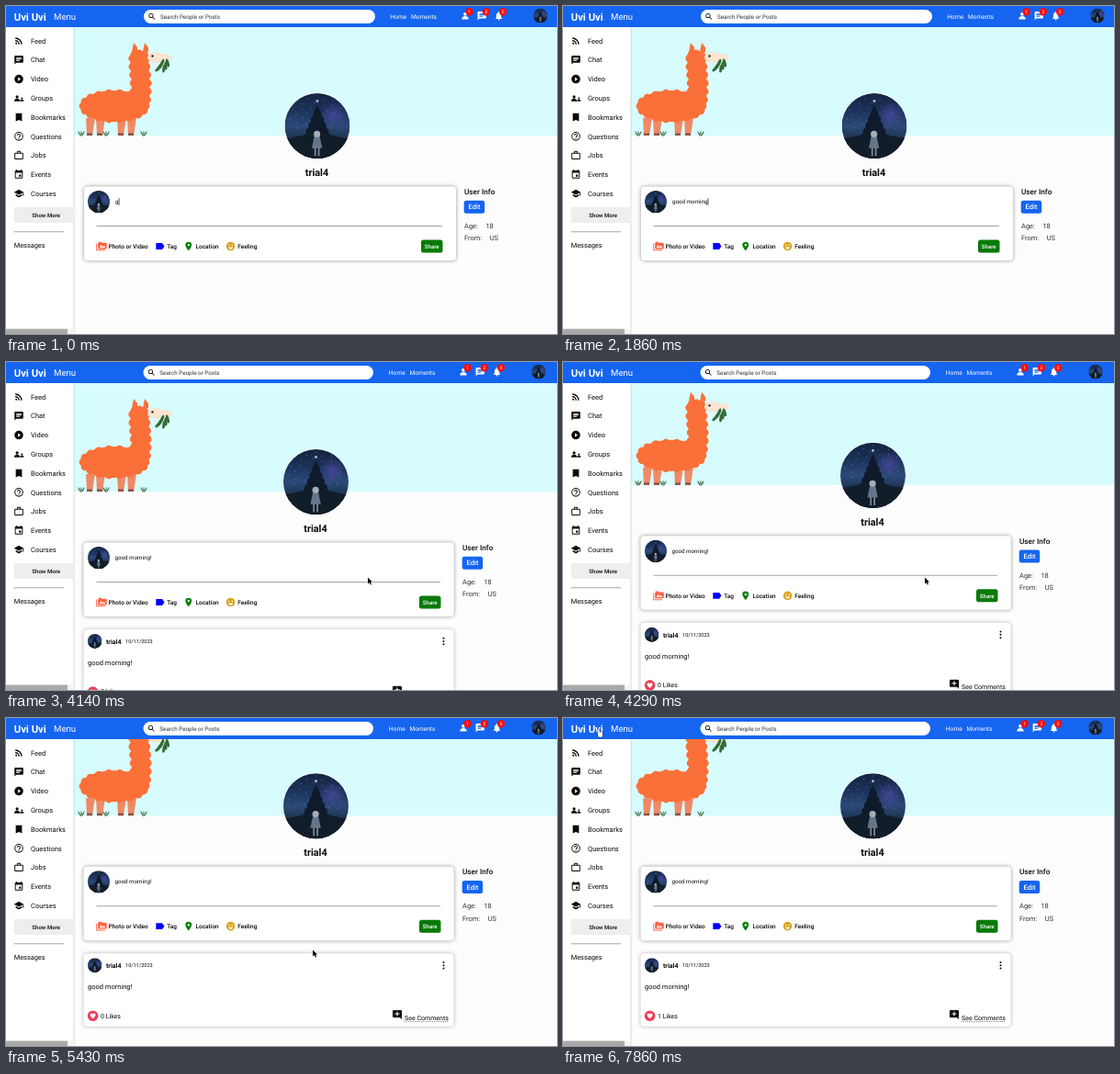
Write an HTML page with a canvas that moves like this. It is 600x357 px and loops after 8 s.

```html
<!DOCTYPE html>
<html lang="en">
<head>
<meta charset="utf-8">
<title>Profile page</title>
<style>
  html, body { margin: 0; width: 100%; height: 100%; overflow: hidden; background: #fdfdfd; }
  canvas { display: block; width: 600px; height: 357px; }
</style>
</head>
<body>
<canvas id="stage"></canvas>
<script>
const W = 600, H = 357, LOOP = 8000, STEP = 1000 / 7, TAU = Math.PI * 2;
const BLUE = '#1565f0', INK = '#0a0a0a', FONT = 'Roboto, Arial, sans-serif';
const SITE = 'Uvi Uvi', USER = 'trial4', POST = 'good morning!';

const canvas = document.getElementById('stage');
const c = canvas.getContext('2d');
const dpr = window.devicePixelRatio || 1;
canvas.width = W * dpr;
canvas.height = H * dpr;

// Path builders; overlaps cut holes under the even-odd rule
function disc(p, x, y, rx, ry = rx) {
  p.moveTo(x + rx, y);
  p.ellipse(x, y, rx, ry, 0, 0, TAU);
}

function block(p, x, y, w, h, r = 0) {
  p.roundRect(x, y, w, h, r);
}

function shape(p, ...points) {
  points.forEach(([x, y], i) => i ? p.lineTo(x, y) : p.moveTo(x, y));
  p.closePath();
}

// Head and shoulders, feet on y
function bust(p, x, y, r) {
  disc(p, x, y - 3 * r, r);
  p.moveTo(x + 2 * r, y);
  p.lineTo(x - 2 * r, y);
  p.bezierCurveTo(x - 2 * r, y - 2.4 * r, x + 2 * r, y - 2.4 * r, x + 2 * r, y);
}

// Icons on a 24 unit grid
const ICONS = {
  feed(p) {
    disc(p, 6.2, 17.8, 2.2);
    for (const r of [7.1, 12.8]) {
      p.moveTo(4, 20 - r);
      p.arc(4, 20, r, -TAU / 4, 0);
      p.arc(4, 20, r + 2.8, 0, -TAU / 4, true);
    }
  },
  chat(p) {
    block(p, 2, 2, 20, 16, 2);
    shape(p, [2, 18], [6, 18], [2, 22]);
    for (let i = 0; i < 3; i++) block(p, 6, 6 + 3 * i, i < 2 ? 12 : 8, 2);
  },
  play(p) {
    disc(p, 12, 12, 10);
    shape(p, [10, 7.5], [10, 16.5], [16, 12]);
  },
  group(p) {
    bust(p, 8, 19, 3.3);
    bust(p, 19, 19, 2.2);
  },
  mark(p) {
    shape(p, [5, 3], [19, 3], [19, 21], [12, 18], [5, 21]);
  },
  help(p) {
    disc(p, 12, 12, 10);
    disc(p, 12, 12, 8);
    block(p, 11, 16, 2, 2);
    p.moveTo(8, 10);
    p.arc(12, 10, 4, TAU / 2, TAU / 8);
    p.lineTo(13, 15);
    p.lineTo(11, 15);
    p.arc(12, 10, 2, TAU / 8, TAU / 2, true);
  },
  work(p) {
    block(p, 2, 6, 20, 15, 2);
    block(p, 4, 8, 16, 11);
    shape(p, [8, 6], [8, 2], [16, 2], [16, 6], [14, 6], [14, 4], [10, 4], [10, 6]);
  },
  event(p) {
    block(p, 3, 3, 18, 18, 2);
    block(p, 5, 8, 14, 11);
    block(p, 12, 12, 5, 5);
    for (const x of [6, 16]) block(p, x, 1, 2, 2);
  },
  school(p) {
    shape(p, [12, 3], [1, 9], [12, 15], [23, 9]);
    shape(p, [5, 13], [5, 17], [12, 21], [19, 17], [19, 13], [12, 17]);
    block(p, 21, 10, 2, 7);
  },
  person(p) {
    bust(p, 12, 20, 4);
  },
  bell(p) {
    p.moveTo(4, 19);
    p.bezierCurveTo(9, 16, 3, 4, 12, 4);
    p.bezierCurveTo(21, 4, 15, 16, 20, 19);
    disc(p, 12, 3.5, 1.5);
    disc(p, 12, 20.5, 2, 1.5);
  },
  search(p) {
    disc(p, 9.5, 9.5, 6.5);
    disc(p, 9.5, 9.5, 4.5);
    shape(p, [15, 13.6], [20.5, 19], [19, 20.5], [13.6, 15]);
  },
  media(p) {
    block(p, 4, 4, 20, 14, 2);
    block(p, 5, 2, 7, 2);
    shape(p, [0, 6], [2, 6], [2, 20], [20, 20], [20, 22], [0, 22]);
    shape(p, [7, 15], [11.5, 9], [15, 13.5], [17.5, 10.5], [21, 15]);
  },
  tag(p) {
    shape(p, [3, 5], [17, 5], [22, 12], [17, 19], [3, 19]);
  },
  pin(p) {
    p.moveTo(12, 22);
    p.bezierCurveTo(1, 9, 4, 2, 12, 2);
    p.bezierCurveTo(20, 2, 23, 9, 12, 22);
    disc(p, 12, 9, 2.5);
  },
  smile(p) {
    disc(p, 12, 12, 10);
    for (const x of [8.5, 15.5]) disc(p, x, 9.5, 1.5);
    p.moveTo(17, 14);
    p.arc(12, 13.5, 5, 0.1, TAU / 2 - 0.1);
  },
  comment(p) {
    block(p, 2, 2, 20, 16, 2);
    shape(p, [18, 18], [22, 18], [22, 22]);
    block(p, 7, 9, 10, 2);
    for (const y of [5, 11]) block(p, 11, y, 2, 4);
  },
  heart(p) {
    p.moveTo(12, 21.4);
    p.bezierCurveTo(-6, 7, 6, -2, 12, 5);
    p.bezierCurveTo(18, -2, 30, 7, 12, 21.4);
  }
};
for (const name in ICONS) {
  const p = new Path2D();
  ICONS[name](p);
  ICONS[name] = p;
}

const MENU = { feed: 'Feed', chat: 'Chat', play: 'Video', group: 'Groups', mark: 'Bookmarks',
  help: 'Questions', work: 'Jobs', event: 'Events', school: 'Courses' };
const TOOLS = [['media', 'tomato', 'Photo or Video'], ['tag', 'blue', 'Tag'],
  ['pin', 'green', 'Location'], ['smile', 'goldenrod', 'Feeling']];
const ALERTS = { person: 1, chat: 3, bell: 0 };

// Text whose capitals are centred on y
function text(s, x, y, size, weight = 400, color = INK, align = 'left') {
  c.font = `${weight} ${size}px ${FONT}`;
  c.textAlign = align;
  c.fillStyle = color;
  c.fillText(s, x, y + size * 0.355);
}

function box(x, y, w, h, r, color) {
  c.fillStyle = color;
  c.beginPath();
  c.roundRect(x, y, w, h, r);
  c.fill();
}

function oval(x, y, rx, ry, color, turn = 0) {
  c.fillStyle = color;
  c.beginPath();
  c.ellipse(x, y, rx, ry, turn, 0, TAU);
  c.fill();
}

const dot = (x, y, r, color) => oval(x, y, r, r, color);

function poly(color, ...points) {
  c.fillStyle = color;
  c.beginPath();
  shape(c, ...points);
  c.fill();
}

function icon(name, x, y, size, color = INK) {
  c.save();
  c.translate(x - size / 2, y - size / 2);
  c.scale(size / 24, size / 24);
  c.fillStyle = color;
  c.fill(ICONS[name], 'evenodd');
  c.restore();
}

function card(x, y, w, h, shade) {
  c.save();
  c.shadowColor = `rgba(0,0,0,${shade})`;
  c.shadowBlur = 4 * dpr;
  box(x, y, w, h, 4, '#fff');
  c.restore();
}

function rule(x1, x2, y) {
  box(x1, y - 0.5, x2 - x1, 1, 0, '#a4a4a4');
}

function gradient(g, ...colors) {
  colors.forEach((color, i) => g.addColorStop(i / (colors.length - 1), color));
  c.fillStyle = g;
  c.fillRect(-1, -1, 2, 2);
}

// Night scene in a round crop
function avatar(x, y, r) {
  c.save();
  c.translate(x, y);
  c.scale(r, r);
  c.beginPath();
  c.arc(0, 0, 1, 0, TAU);
  c.clip();
  gradient(c.createLinearGradient(0, -1, 0, 1), '#13243f', '#1a3158', '#2b4978', '#1a2d43', '#121d29');
  gradient(c.createRadialGradient(0.5, -0.35, 0, 0.5, -0.35, 0.4), 'rgba(85,75,175,.65)', 'rgba(85,75,175,0)');
  for (let i = 0; i < 40; i++) {
    const a = i * 2.4, d = Math.sqrt(i / 40);
    dot(Math.cos(a) * d, Math.sin(a) * d * 0.6 - 0.35, 0.014, '#7f97cc');
  }
  dot(0, -0.76, 0.04, '#aebcd8');
  // stepped tower
  for (let i = 0; i < 6; i++) {
    const top = -0.65 + i * 0.17, half = 0.12 + i * 0.075;
    poly('#0f1a2b', [0, top], [half, top + 0.25], [half, 1], [-half, 1], [-half, top + 0.25]);
  }
  poly('#121d2a', [-1, 0.4], [0, 0.2], [1, 0.4], [1, 1], [-1, 1]);
  poly('#65758a', [-0.09, 0.3], [0.07, 0.3], [0.15, 0.68], [-0.17, 0.68]);
  for (const lx of [-0.09, 0.02]) box(lx, 0.66, 0.05, 0.26, 0, '#7b889a');
  dot(-0.01, 0.25, 0.1, '#a3adbb');
  c.restore();
}

// Ellipse with a curly rim
function wool(x, y, rx, ry, curls, color) {
  oval(x, y, rx, ry, color);
  for (let i = 0; i < curls; i++) {
    const a = i / curls * TAU;
    dot(x + Math.cos(a) * (rx - 3), y + Math.sin(a) * (ry - 3), 4.4, color);
  }
}

function llama() {
  const coat = '#fb7039';
  for (const x of [87, 98, 121, 132]) {
    poly('#ef8a66', [x, 122], [x + 10, 122], [x + 7, 141], [x + 1, 141]);
    box(x + 1, 138.5, 6, 2.5, 0, '#8b5148');
  }
  for (const x of [82, 109, 150]) {
    for (const turn of [-0.5, 0, 0.5]) oval(x + turn * 4, 139, 0.6, 3, '#35683a', turn);
  }
  wool(118, 109, 37, 17, 18, coat);
  for (let i = 0; i < 6; i++) {
    wool(146 + Math.sin(i) * 0.8, 102 - i * 9, 10.5, 8, 8, coat);
  }
  for (const x of [138, 150]) poly(coat, [x - 1, 50], [x + 1, 40], [x + 5, 45], [x + 5, 50]);
  oval(163, 56, 9, 6, '#f8e5d2');
  oval(172, 56, 9, 4, '#f8e5d2');
  dot(159.5, 54.5, 1.2, '#38231f');
  for (let i = 0; i < 6; i++) {
    oval(176 - i * 2, 62 + i % 3 * 3, 4.6, 1.6, '#356b35', 1.3 + i * 0.22);
  }
}

function composer(dx, typed, caret) {
  card(85 - dx / 4, 196.5, 405 - dx * 0.85, 80.5, 0.42);
  avatar(101, 213, 12);
  const x = 119 - dx / 4;
  text(typed, x, 213, 6.2);
  if (caret) box(x + c.measureText(typed).width + 0.2, 209.3, 0.7, 7.4, 0, '#000');
  rule(98.5, 475 - dx, 239.5);
  let left = 98.3;
  for (const [name, color, label] of TOOLS) {
    icon(name, left + 5.7, 261.5, 11.6, color);
    text(label, left + 13.3, 261.5, 6.5, 500);
    left += 20.5 + c.measureText(label).width;
  }
  box(452 - dx, 254.5, 23.5, 14, 2.5, '#087a08');
  text('Share', 463.7 - dx, 261.6, 6.1, 500, '#fff', 'center');
}

function post(likes) {
  card(84.5, 291, 403, 79.5, 0.3);
  avatar(96.7, 303.8, 7.8);
  text(USER, 109, 304.2, 7, 700);
  text('10/11/2023', 130, 304, 5.6);
  for (const dy of [-3.3, 0, 3.3]) dot(476.5, 304 + dy, 1, INK);
  text(POST, 89, 327, 7.5);
  dot(94.6, 359, 5.8, '#ec3e57');
  icon('heart', 94.6, 359.3, 7.4, '#fff');
  text(likes + ' Likes', 103, 359, 7);
  icon('comment', 426, 357.8, 12);
  text('See Comments', 434, 361, 7.05);
  for (let x = 434; x < 482; x += 2) box(x, 365, 1, 0.8, 0, '#555');
}

function userInfo(x) {
  text('User Info', x, 202, 8.2, 500);
  box(x - 0.3, 211.7, 22.5, 14, 2.5, BLUE);
  text('Edit', x + 11, 218.7, 7.5, 500, '#fff', 'center');
  [['Age:', '18'], ['From:', 'US']].forEach(([label, value], i) => {
    const y = 239 + i * 13.8;
    text(label, x, y, 7.5, 400, '#333');
    text(value, x + 8.5 + c.measureText(label).width, y, 7.5, 400, '#333');
  });
}

function profile(s, dx) {
  c.save();
  c.translate(0, -s.scroll);
  box(74, 0, 526, 141, 0, '#d7fcfd');
  llama();
  const mid = 339 - dx * 0.75;
  dot(mid, 130.5, 36.2, '#fff');
  avatar(mid, 130.5, 35.5);
  text(USER, mid - 0.5, 181, 10.9, 700, INK, 'center');
  composer(dx, s.typed, !s.shared);
  userInfo(499 - dx);
  if (s.shared) post(s.likes);
  c.restore();
}

function sidebar() {
  c.save();
  c.shadowColor = 'rgba(0,0,0,.2)';
  c.shadowBlur = 2 * dpr;
  box(0, 15, 73.5, 350, 0, '#fff');
  c.restore();
  Object.entries(MENU).forEach(([name, label], i) => {
    const y = 38 + i * 20.77;
    icon(name, 14, y, 11.5);
    text(label, 27, y, 7.5);
  });
  box(8.7, 219, 65, 17, [2, 0, 0, 2], '#eee');
  text('Show More', 43.7, 227.7, 6.1, 500, INK, 'center');
  rule(8.7, 63, 245.7);
  text('Messages', 8.7, 260.5, 7.4);
  box(0, 351.5, 73.5, 7, 0, '#f3f3f3');
  box(0, 351.5, 67, 7, 0, '#a9a9a9');
}

function header(dx) {
  box(0, -2, W, 25, 0, BLUE);
  text(SITE, 8.7, 11.7, 11.3, 700, '#fff');
  text('Menu', 52, 12, 9.6, 400, '#fff');
  box(150 - dx / 4, 4, 252 - dx * 0.75, 15, 7.5, '#fff');
  icon('search', 159 - dx / 4, 11.5, 9.5);
  text('Search People or Posts', 168 - dx / 3, 11.6, 6.3, 400, '#333');
  text('Home', 418.3 - dx * 0.75, 11.6, 6.7, 400, '#fff');
  text('Moments', 441 - dx * 0.8, 11.6, 6.6, 400, '#fff');
  Object.entries(ALERTS).forEach(([name, count], i) => {
    const x = 500 + i * 18.3 - dx;
    icon(name, x, 10.7, 11.3, '#fff');
    dot(x + 4.6, 6.2, 4.2, '#fb0d0d');
    text(count, x + 4.6, 6.2, 5, 400, '#fff', 'center');
  });
  avatar(582 - dx, 10.5, 7.8);
}

function arrow() {
  c.beginPath();
  shape(c, [0, 0], [0, 7], [1.7, 5.5], [2.8, 8], [4, 7.5], [2.9, 5], [5, 5]);
}

function hand() {
  c.beginPath();
  c.roundRect(1.2, 0, 1.5, 6, 0.7);
  c.roundRect(1.2, 3.2, 5, 5.6, 1.2);
  shape(c, [0, 4.4], [1.8, 5], [2, 8]);
}

function pointer(x, y, pressing) {
  c.save();
  c.translate(x, y);
  c.lineJoin = 'round';
  c.lineWidth = 0.9;
  c.strokeStyle = pressing ? '#000' : '#fff';
  c.fillStyle = pressing ? '#fff' : '#000';
  (pressing ? hand : arrow)();
  c.stroke();
  c.fill();
  c.restore();
}

// Eased value between keys; the first entry of each key is its time
function track(t, keys, col = 1) {
  const i = keys.findIndex(k => t < k[0]);
  if (i === 0) return keys[0][col];
  if (i < 0) return keys[keys.length - 1][col];
  const a = keys[i - 1], b = keys[i];
  const u = (t - a[0]) / (b[0] - a[0]);
  return a[col] + (b[col] - a[col]) * u * u * (3 - 2 * u);
}

const PATH = [[2430, 250, 216], [2860, 456.5, 258], [3430, 456.5, 258], [4000, 394, 234.5],
  [5140, 394, 234.5], [6140, 97, 324], [6570, 97, 324], [7710, 37, 12]];
const TARGETS = [[456.5, 258], [97, 324], [37, 12]];
const SCROLL = [[4140, 0], [4640, 34.8]];
// The whole page is pulled past its end, then springs back
const PULL = [[4500, 0], [4700, 1.2], [5100, 0]];

function draw(t) {
  const typedCount = t < 2290 ? Math.min(12, 1 + Math.floor(t / 145)) : 13;
  const state = {
    shared: t >= 3290,
    typed: POST.slice(0, typedCount),
    scroll: track(t, SCROLL),
    likes: t >= 6280 ? 1 : 0
  };
  const dx = state.shared ? 2 : 0;
  c.setTransform(dpr, 0, 0, dpr, 0, 0);
  c.textRendering = 'geometricPrecision';
  box(0, 0, W, H, 0, '#fdfdfd');
  c.save();
  c.translate(0, -track(t, PULL));
  profile(state, dx);
  sidebar();
  header(dx);
  c.restore();
  if (t >= 2560) {
    const x = track(t, PATH), y = track(t, PATH, 2);
    pointer(x, y, TARGETS.some(([tx, ty]) => Math.hypot(x - tx, y - ty) < 8));
  }
}

const start = performance.now();
function tick() {
  const t = (performance.now() - start) % LOOP;
  draw(Math.floor((t + 5) / STEP) * STEP % LOOP);
  requestAnimationFrame(tick);
}
tick();
</script>
</body>
</html>
```
